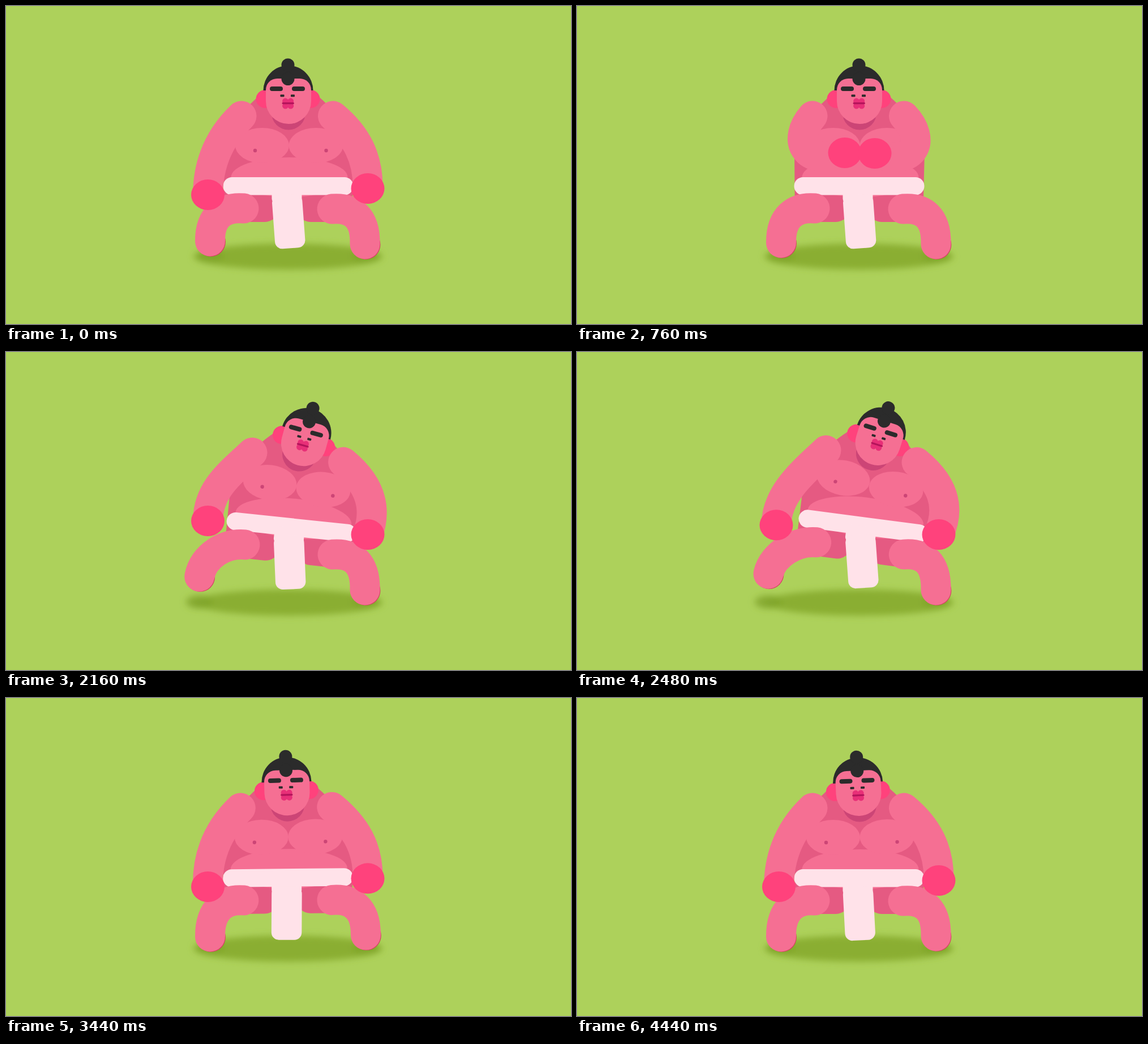
An HTML page that plays this animation: 998x561 px, repeating every 4.48 s.

```html
<!DOCTYPE html>
<html lang="en">
<head>
<meta charset="utf-8">
<title>Wrestler warm-up</title>
<style>
  html, body { margin: 0; width: 100%; height: 100%; overflow: hidden; background: #add15b; }
  svg { display: block; width: 100vw; height: 100vh; }
  .skin { fill: #f56f93; }
  .dark { fill: #e55a82; }
  .shade { fill: #cc4576; }
  .hot { fill: #ff427c; }
  .hair { fill: #2b2b2b; }
  .cloth { fill: #ffe2e9; }
  .lips { fill: #e82f78; }
  .edge { fill: #d2405f; }
  .limb { fill: none; stroke: #f56f93; stroke-width: 53; stroke-linecap: round; }
</style>
</head>
<body>
<svg viewBox="0 0 998 561">
  <defs>
    <filter id="soft" x="-20%" y="-60%" width="140%" height="220%"><feGaussianBlur stdDeviation="6"/></filter>
  </defs>
  <rect width="998" height="561" fill="#add15b"/>
  <g filter="url(#soft)">
    <ellipse cx="498" cy="442" rx="167" ry="23" fill="#8aae33"/>
    <ellipse id="shadowL" cy="441" rx="24" ry="12" fill="#80a42a" opacity=".8"/>
    <ellipse id="shadowR" cy="441" rx="24" ry="12" fill="#80a42a" opacity=".8"/>
  </g>

  <g id="body">
    <path class="dark" d="M499 128Q532 135 580 187Q614 215 614 255L611 381H538A25 25 0 0 1 513 356V340H482V356A25 25 0 0 1 457 381H385L384 255Q384 215 418 187Q466 135 499 128Z"/>
    <circle class="shade" cx="499" cy="188.5" r="30"/>
    <ellipse class="skin" cx="500.5" cy="302" rx="103" ry="35"/>
    <g id="pecL">
      <ellipse class="skin" cx="452.5" cy="246" rx="47.5" ry="31"/>
      <circle class="shade" cx="440" cy="255" r="3.2"/>
    </g>
    <g id="pecR">
      <ellipse class="skin" cx="547.5" cy="246" rx="48" ry="31"/>
      <circle class="shade" cx="565.5" cy="255" r="3.2"/>
    </g>
    <rect class="cloth" x="383.5" y="302" width="230" height="31.5" rx="15.75"/>
    <rect class="cloth" x="469.5" y="318" width="53" height="31" rx="9"/>
    <rect id="flap" class="cloth" x="469.5" y="333" width="53.5" height="94.5" rx="13"/>

    <g id="head">
      <circle class="hot" cx="457.5" cy="164" r="16"/>
      <circle class="hot" cx="538.5" cy="164" r="16"/>
      <path class="hair" d="M454.5 149A44 44 0 0 1 542.5 149Z"/>
      <path class="skin" d="M459 148A20 20 0 0 1 479 128H519A20 20 0 0 1 539 148V168A40 40 0 0 1 459 168Z"/>
      <circle class="hair" cx="498" cy="104" r="11.5"/>
      <circle class="hair" cx="498" cy="128.5" r="11.5"/>
      <rect class="hair" x="466" y="142" width="23" height="8" rx="4"/>
      <rect class="hair" x="505" y="142" width="23" height="8" rx="4"/>
      <rect class="hair" x="484.5" y="156.3" width="7" height="4" rx="1"/>
      <rect class="hair" x="503" y="156.3" width="7" height="4" rx="1"/>
      <g class="lips">
        <circle cx="493.5" cy="168" r="5.4"/>
        <circle cx="502.8" cy="168" r="5.4"/>
        <circle cx="493.5" cy="176.2" r="5.4"/>
        <circle cx="502.8" cy="176.2" r="5.4"/>
      </g>
      <rect x="487.5" y="170" width="21.5" height="3.2" rx="1.6" fill="#b5135b"/>
    </g>
  </g>

  <circle id="edgeL" class="edge" r="26"/>
  <circle id="edgeR" class="edge" r="26"/>
  <path id="legL" class="limb"/>
  <path id="legR" class="limb"/>
  <path id="armL" class="limb"/>
  <path id="armR" class="limb"/>
  <ellipse id="handL" class="hot" rx="29.5" ry="27"/>
  <ellipse id="handR" class="hot" rx="29.5" ry="27"/>
</svg>

<script>
const LOOP = 4480, STEP = 40;
const el = {};
document.querySelectorAll('[id]').forEach(n => el[n.id] = n);

// Smooth monotone interpolation through keys [time, ...values].
function track(keys, t) {
  const last = keys.length - 1;
  if (t <= keys[0][0]) return keys[0].slice(1);
  if (t >= keys[last][0]) return keys[last].slice(1);
  let i = 0;
  while (t > keys[i + 1][0]) i++;
  const span = keys[i + 1][0] - keys[i][0];
  const u = (t - keys[i][0]) / span;
  return keys[i].slice(1).map((a, k) => {
    const c = k + 1, b = keys[i + 1][c];
    const rise = j => (keys[j + 1][c] - keys[j][c]) / (keys[j + 1][0] - keys[j][0]);
    const slope = j => {
      if (j === 0 || j === last) return 0;
      const p = rise(j - 1), q = rise(j);
      return p * q <= 0 ? 0 : 2 * p * q / (p + q);
    };
    const w = u * u * (3 - 2 * u);
    return a + (b - a) * w
      + span * slope(i) * u * (1 - u) * (1 - u)
      - span * slope(i + 1) * u * u * (1 - u);
  });
}

// One stomp, timed from the start of the lift.
const stomp = {
  tilt: [[0, 0], [260, 6], [340, 7.8], [420, 11.5], [500, 9.8], [540, 8.5], [700, 5], [860, 3.2], [980, 0]],
  foot: [[0, 0], [260, .53], [340, .85], [420, 1], [500, .94], [540, .8], [760, 0]],
  hand: [[0, 0, 0], [260, 0, -35], [400, 6, -46], [500, 5, -35], [680, 4, -20], [860, 3, -9.5], [980, 0, 0]],
  head: [[0, 0], [260, 9.5], [420, 16], [500, 14.9], [860, -14.7], [1060, 2.5], [1100, 0]],
  pec: [[0, 0], [260, -2.6], [420, -10], [500, -10], [860, 6], [1020, -2], [1100, 0]]
};

const flapKeys = [[0, -4.2], [760, -4.1], [1400, 0], [1900, 0], [2160, -2.4], [2440, -5], [2760, 16],
  [2960, -7], [3160, 3], [3380, 0], [3880, 7.6], [4200, -11], [4440, -3], [4480, -4.2]];

// Arm poses: two curve controls, then the hand.
const clap = (rest, half, shut, late) => [[0, ...rest], [380, ...half], [730, ...shut],
  [1080 + late, ...shut], [1400, ...half], [1690 + late, ...rest]];

const sides = [
  {
    id: 'L', dir: -1, start: 1900,
    shoulder: [416, 194], hip: [420, 357], knee: [385, 354, 360, 374], foot: [360.5, 421], reach: [35.5, -47],
    arm: clap([377, 231, 357, 277, 356.5, 333], [358, 215, 362, 280, 419, 289], [380, 235, 400, 285, 473, 259], 0)
  },
  {
    id: 'R', dir: 1, start: 3380,
    shoulder: [577.5, 194], hip: [576, 358], knee: [612, 355, 635, 373], foot: [634, 420], reach: [33, -44],
    arm: clap([619, 228, 640, 268, 639, 322], [624, 225, 614, 275, 564, 305], [617, 235, 599, 285, 526, 260], 30)
  }
];

const set = (node, attrs) => { for (const k in attrs) node.setAttribute(k, attrs[k].toFixed ? attrs[k].toFixed(2) : attrs[k]); };
const curve = (...p) => 'M' + p.slice(0, 2) + 'C' + p.slice(2);

function rotate([x, y], deg, [px, py]) {
  const a = deg * Math.PI / 180, c = Math.cos(a), s = Math.sin(a);
  return [px + (x - px) * c - (y - py) * s, py + (x - px) * s + (y - py) * c];
}

function draw(t) {
  let tilt = 0, nod = 0;
  for (const s of sides) {
    tilt -= s.dir * track(stomp.tilt, t - s.start)[0];
    nod -= s.dir * track(stomp.head, t - s.start)[0];
  }
  const pivot = [tilt > 0 ? 584 : 416, 367];
  set(el.body, { transform: `rotate(${tilt} ${pivot})` });
  set(el.head, { transform: `rotate(${nod} 499 203)` });
  set(el.flap, { transform: `rotate(${track(flapKeys, t)[0] - tilt} 496.5 340)` });

  for (const s of sides) {
    const p = t - s.start;
    const lift = track(stomp.foot, p)[0];
    const [hx, hy] = track(stomp.hand, p);
    const pec = track(stomp.pec, p)[0];
    set(el['pec' + s.id], { transform: `translate(0 ${pec}) rotate(${s.dir * pec * .4} ${499 + s.dir * 48} 246)` });

    // The left foot slides down slowly before its lift.
    const settle = s.dir < 0 ? -6 * Math.max(0, 1 - t / 1680) : 0;
    const dx = s.dir * s.reach[0] * lift, dy = s.reach[1] * lift + settle;
    const fx = s.foot[0] + dx, fy = s.foot[1] + dy;
    const hip = rotate(s.hip, tilt, pivot);
    const [k1x, k1y, k2x, k2y] = s.knee;
    set(el['leg' + s.id], {
      d: curve(...hip, k1x + hip[0] - s.hip[0], k1y + hip[1] - s.hip[1], k2x + dx * .6, k2y + dy * .6, fx, fy)
    });
    set(el['edge' + s.id], { cx: fx + 1.4, cy: fy + 1 });
    set(el['shadow' + s.id], { cx: fx });

    const sh = rotate(s.shoulder, tilt, pivot);
    const sx = sh[0] - s.shoulder[0], sy = sh[1] - s.shoulder[1];
    const bow = s.dir * Math.max(0, s.dir * sx);
    const [ax, ay, bx, by, ex, ey] = track(s.arm, t);
    const hand = [ex + s.dir * hx, ey + hy];
    set(el['arm' + s.id], {
      d: curve(...sh, ax + sx, ay + sy, bx + s.dir * hx + bow, by + hy, ...hand)
    });
    set(el['hand' + s.id], { cx: hand[0], cy: hand[1] });
  }
}

const begin = performance.now();
function tick(now) {
  const t = Math.max(0, now - begin) % LOOP;
  draw(Math.floor(t / STEP) * STEP);
  requestAnimationFrame(tick);
}
draw(0);
requestAnimationFrame(tick);
</script>
</body>
</html>
```
